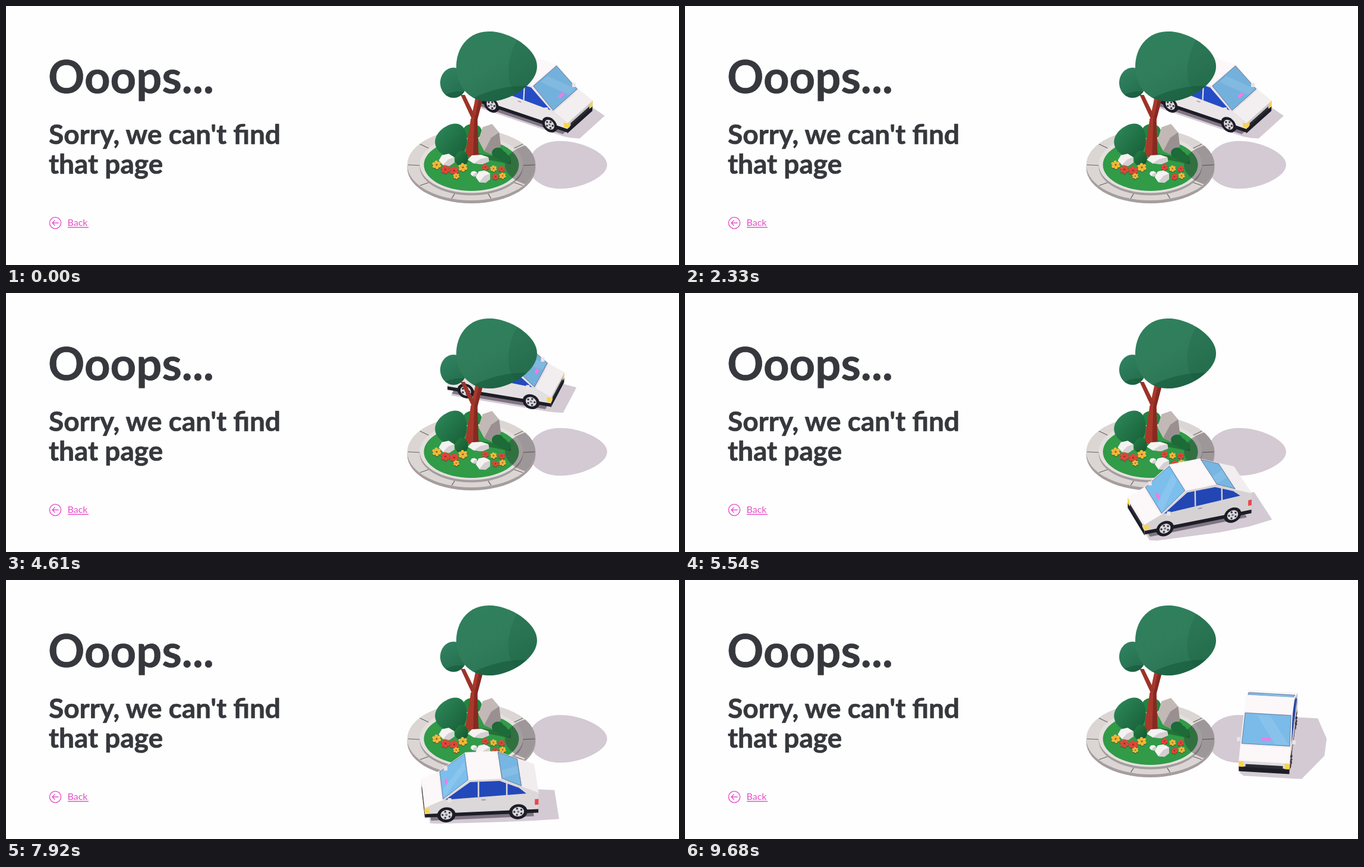
Write an HTML page with a canvas that moves like this. It is 1133 by 437 pixels and loops after 9.78 s.

```html
<!DOCTYPE html>
<html lang="en">
<head>
<meta charset="utf-8">
<title>Page not found</title>
<style>
  html, body { margin: 0; width: 100%; height: 100%; overflow: hidden; background: #fefefe; }
  canvas, svg { position: absolute; left: 0; top: 0; display: block; }
  text { font-family: Lato, "Open Sans", sans-serif; font-weight: 700; fill: #36383d; stroke: #36383d; stroke-width: .7; }
  .back text { font-weight: 400; fill: #e650c8; stroke: none; }
  .back path, .back circle { fill: none; stroke: #e650c8; stroke-width: 1.4; }
</style>
</head>
<body>
<canvas id="stage" width="1133" height="437"></canvas>
<svg width="1133" height="437">
  <text x="71" y="147" font-size="76">Ooops...</text>
  <text x="72" y="233" font-size="46">Sorry, we can't find</text>
  <text x="72" y="283" font-size="46">that page</text>
  <g class="back">
    <circle cx="83" cy="366" r="9.6"/>
    <path d="M88.5 366H78M82.5 361.5L78 366L82.5 370.5M104 373.5H139"/>
    <text x="103.5" y="371" font-size="16">Back</text>
  </g>
</svg>
<script>
const W = 1133, H = 437, LOOP = 9780, TAU = Math.PI * 2;
const CX = 783.5, CY = 268, TILT = 0.555, RISE = 0.832, ORBIT = 199;
const SHADOW = '#d3cad4', RED = '#e2463b', GOLD = '#f4b93a', BLACK = '#1d1d26';
let ctx;

// ---- drawing helpers ----
const ring = (n, f) => Array.from({ length: n }, (_, i) => f(i * TAU / n, i));

function poly(pts, fill, stroke, width = 1) {
  ctx.beginPath();
  pts.forEach(([x, y]) => ctx.lineTo(x, y));
  ctx.closePath();
  ctx.fillStyle = fill;
  ctx.fill();
  if (stroke) { ctx.strokeStyle = stroke; ctx.lineWidth = width; ctx.stroke(); }
}

// Ellipse that narrows towards its leading end
function egg(x, y, rx, ry, fill, taper = 0, turn = 0) {
  const c = Math.cos(turn), s = Math.sin(turn);
  poly(ring(60, a => {
    const u = rx * Math.cos(a), v = ry * Math.sin(a) * (1 - taper * Math.cos(a));
    return [x + u * c - v * s, y + u * s + v * c];
  }), fill);
}

// Keeps what is painted inside the egg drawn last
function within(inside) {
  ctx.save();
  ctx.clip();
  inside();
  ctx.restore();
}

function ramp(x0, y0, x1, y1, ...colors) {
  const g = ctx.createLinearGradient(x0, y0, x1, y1);
  colors.forEach((c, i) => g.addColorStop(i / (colors.length - 1), c));
  return g;
}

function random(seed) {
  return () => (seed = seed * 16807 % 2147483647) / 2147483647;
}

function stone(x, y, rx, ry, seed, light, dark) {
  const rnd = random(seed * 7919);
  const edge = ring(7, a => {
    const r = 0.88 + 0.16 * rnd();
    return [x + rx * r * Math.cos(a - 0.5), y + ry * r * Math.sin(a - 0.5)];
  });
  poly(edge, light);
  poly([[x + rx * 0.1, y - ry * 0.1], ...edge.slice(0, 4)], dark);
}

function limb(x0, y0, w0, x1, y1, w1, color) {
  const side = (x, y, w) => [[x - w / 2, y], [x + w / 2, y]];
  poly([...side(x0, y0, w0), ...side(x1, y1, w1).reverse()], color);
}

function flower(x, y, r, color) {
  for (const [drop, fill] of [[1.2, 'rgba(70,30,10,.5)'], [0, color]])
    ring(6, a => egg(x + Math.cos(a + 0.4) * r * 0.65, y + drop + Math.sin(a + 0.4) * r * 0.6, r * 0.33, r * 0.33, fill));
  egg(x, y, r * 0.45, r * 0.4, color);
  egg(x, y, r * 0.2, r * 0.2, 'rgba(110,40,10,.65)');
}

function flowerRow(x, y, n, gap, rise, r, isRed) {
  for (let i = 0; i < n; i++)
    flower(x + gap * i, y + rise * Math.sin(i * 0.9), r, isRed(i) ? RED : GOLD);
}

// ---- roundabout ----
const treeShade = (fill, grow = 0) => egg(946, 268, 66 + grow, 39.5, fill, 0.2);

function drawRing() {
  egg(CX, 273, 108, 60, '#a59d9e');
  egg(CX, 268, 108, 60, '#dbd6d3');
  ctx.strokeStyle = '#6a6364';
  ctx.lineWidth = 1.2;
  ring(10, a => {
    const c = Math.cos(a), s = Math.sin(a);
    ctx.beginPath();
    ctx.moveTo(CX + 87 * c, 269 + 48 * s);
    ctx.lineTo(CX + 107 * c, 268 + 59.5 * s);
    ctx.stroke();
  });
  egg(CX, 271, 87, 48.5, '#a49c9f');
  egg(CX, 267, 87, 48.5, '#e4e0de');
  egg(CX, 268, 80, 44, '#319b48');
  egg(CX, 268, 108, 60, 'transparent');
  within(() => {
    treeShade('rgba(50,40,50,.36)', 40);
    poly([[788, 248], [850, 258], [850, 267], [790, 255]], 'rgba(20,50,30,.4)');
  });
}

function drawGarden() {
  egg(785, 212, 16, 13, '#21863f');
  egg(751, 226, 29, 26, ramp(730, 205, 778, 245, '#2b8556', '#186039'), 0.2, -1.1);
  stone(815, 225, 19, 27, 3, '#c2b9b6', '#9a9091');
  for (let i = 0; i < 3; i++) egg(828 + 7 * i, 248 + 5 * i, 10 - i, 9 - i, '#1c6b38');

  limb(784, 254, 23, 788, 190, 11, '#a9382b');
  limb(788, 192, 11, 798, 150, 13, '#a9382b');
  limb(787, 188, 8, 769, 150, 7, '#9c3328');
  limb(791, 252, 9, 791, 190, 5, '#852a23');
  limb(791, 192, 5, 801, 150, 7, '#852a23');

  const chalk = ['#f5f3f2', '#d5cfd1'];
  stone(743, 260, 14, 11, 5, ...chalk);
  egg(767, 257, 13, 11, ramp(757, 248, 778, 266, '#237c42', '#135630'), 0.1, -1.4);
  stone(797, 259, 19, 9, 2, ...chalk);
  stone(788, 283, 6, 5, 4, ...chalk);
  stone(804, 288, 13, 12, 8, ...chalk);

  flowerRow(725, 268, 4, 14.7, 10, 8, i => i % 3);
  flowerRow(807, 272, 3, 13.7, 3, 6, i => i % 2 === 0);
  flowerRow(824, 288, 2, 12, -2, 6, i => i === 0);
  flower(758, 287, 5.5, GOLD);
}

function drawCanopy() {
  egg(753.5, 129.5, 22.5, 25.5, ramp(736, 106, 770, 155, '#318361', '#226c4c'));
  within(() => egg(765, 160, 32, 16, 'rgba(12,70,45,.35)'));
  egg(826, 102, 68, 58, ramp(785, 45, 850, 165, '#2f805d', '#317d5b', '#277151'), 0.2);
  within(() => {
    egg(883, 90, 34, 62, 'rgba(18,84,56,.2)', 0, 0.3);
    egg(832, 164, 72, 24, 'rgba(14,76,48,.4)', 0, -0.25);
  });
}

function cache(draw) {
  const layer = document.createElement('canvas');
  layer.width = W;
  layer.height = H;
  ctx = layer.getContext('2d');
  draw();
  return layer;
}

const island = cache(() => { drawRing(); drawGarden(); drawCanopy(); });

// ---- car: side outline as [forward, up], extruded sideways ----
const OUTLINE = [[94, 12], [94, 30], [66, 43], [22, 80], [-30, 80], [-64, 63], [-91, 50], [-91, 12]];
const PANE = [...OUTLINE.slice(2, 6).map(([u, z]) => [u * 0.92, 53 + (z - 53) * 0.85]), [-71, 50]];
const AXLES = [59, -58], SIDES = [-1, 1];
const PAINT = [252, 247, 249], GLASS = [124, 190, 236], BLUE = [40, 82, 212];

const halfWidth = z => 42 - Math.max(0, z - 48) * 0.06;
const shade = (rgb, l) => `rgb(${rgb.map(c => Math.round(Math.min(255, c * l)))})`;
const rect = (f, a0, b0, a1, b1) => [f(a0, b0), f(a1, b0), f(a1, b1), f(a0, b1)];

function area(p) {
  return p.reduce((sum, [x, y], i) => {
    const [a, b] = p[(i + 1) % p.length];
    return sum + x * b - a * y;
  }, 0);
}

function hull(pts) {
  const sorted = [...pts].sort((a, b) => a[0] - b[0] || a[1] - b[1]);
  const half = list => {
    const out = [];
    for (const p of list) {
      while (out.length > 1 && area([out[out.length - 2], out[out.length - 1], p]) <= 0) out.pop();
      out.push(p);
    }
    return out.slice(0, -1);
  };
  return [...half(sorted), ...half(sorted.reverse())];
}

function makeCar(deg) {
  const th = deg * Math.PI / 180, head = th + Math.PI / 2;
  const c = Math.cos(head), s = Math.sin(head);
  const light = (nx, nz) => Math.min(1, 0.88 - 0.09 * nx + 0.13 * nz);

  function at(u, v, z) {
    const x = ORBIT * Math.cos(th) + u * c - v * s;
    const y = ORBIT * Math.sin(th) + u * s + v * c;
    const zoom = 1 / (1 - (y * RISE + z * TILT) / 6000);
    return [CX + x * zoom, CY + (TILT * y - RISE * z) * zoom];
  }

  function shadow() {
    const pts = [...OUTLINE, [86, 2], [-86, 2]].flatMap(([u, z]) => SIDES.map(k => {
      const [x, y] = at(u, k * halfWidth(z), 0);
      return [x + 0.7 * z, y + 0.03 * z];
    }));
    poly(hull(pts), SHADOW);
    poly(rect((u, v) => at(u, v, 3), 84, -40, -84, 40), 'rgba(60,48,66,.55)');
  }

  const disc = (u, v, r, fill) =>
    poly(ring(24, a => at(u + r * Math.cos(a), v, 15 + r * Math.sin(a))), fill);

  function wheel(u, v) {
    disc(u, v, 15, BLACK);
    disc(u, v, 9.5, '#dcd9de');
    ring(5, a => egg(...at(u + 6.3 * Math.cos(a), v, 15 + 6.3 * Math.sin(a)), 1.7, 1.7, '#3a3840'));
    disc(u, v, 2, '#77737c');
  }

  // Panel across the car between two outline points; null when it faces away
  function panel(i) {
    const [u0, z0] = OUTLINE[i], [u1, z1] = OUTLINE[i + 1];
    const on = (t, k) => {
      const z = z0 + (z1 - z0) * t;
      return at(u0 + (u1 - u0) * t, k * halfWidth(z), z);
    };
    const pts = rect(on, 0, -1, 1, 1);
    if (area(pts) * area([[0, 0], [1, 0], [1, 1]]) >= 0) return null;
    const len = Math.hypot(u1 - u0, z1 - z0);
    const l = light((z1 - z0) / len * c, (u0 - u1) / len);
    poly(pts, shade(PAINT, l), shade(PAINT, l), 0.5);
    return { on, l };
  }

  function glass(face, sticker) {
    if (!face) return;
    const { on, l } = face;
    poly(rect(on, 0.04, -0.95, 0.97, 0.95), shade(GLASS, l), 'rgba(25,35,80,.55)', 0.9);
    poly([on(0.08, -0.9), on(0.92, -0.1), on(0.92, 0.45), on(0.08, -0.35)], 'rgba(255,255,255,.1)');
    if (sticker) poly(rect(on, 0.17, -0.18, 0.26, 0.18), '#f07be6');
  }

  function flank(k) {
    if (k * c <= 0) return;
    const on = (u, z) => at(u, k * halfWidth(z), z);
    const l = light(-k * s, 0);
    poly(OUTLINE.map(p => on(...p)), shade(PAINT, l));
    poly(rect(on, 94, 11, -91, 18), BLACK);
    poly(PANE.map(p => on(...p)), shade(BLUE, l));
    for (const u of [8, -38]) poly(rect(on, u, 47, u - 2.5, 76), shade(PAINT, l));
    poly(rect(on, 2, 40, -5, 42), '#99939c');
    poly(rect(on, 94, 20, 87, 29), '#f8d548');
    poly(rect(on, -85, 27, -91, 38), '#e8484f');
    for (const u of AXLES) wheel(u, k * 42.5);
  }

  function lamp(p) {
    const g = ctx.createRadialGradient(...p, 1, ...p, 9);
    g.addColorStop(0, '#ffe04a');
    g.addColorStop(0.5, 'rgba(255,176,40,.85)');
    g.addColorStop(1, 'rgba(255,150,40,0)');
    egg(...p, 9, 9, g);
  }

  function body(blink) {
    for (const u of AXLES)
      for (let v = -42; v <= 42; v += 3) if (Math.abs(v) > 32) disc(u, v, 15, BLACK);
    if (panel(0)) {
      const on = (v, z) => at(94, v, z);
      poly(rect(on, -42, 9, 42, 19), BLACK);
      poly(rect(on, -31, 18, 31, 24), '#2b2b35');
      for (const k of SIDES) poly(rect(on, k * 34, 18, k * 42, 29), '#f8d548');
    }
    const tail = panel(6);
    if (tail) {
      const on = (v, z) => at(-91, v, z);
      poly(rect(on, -42, 11, 42, 17), BLACK);
      poly(rect(on, -14, 24, 14, 35), '#fff', '#d2c9cf', 0.6);
      for (const k of SIDES) poly(rect(on, k * 30, 25, k * 41, 37), '#e8484f');
    }
    panel(1);
    panel(5);
    SIDES.forEach(flank);
    glass(panel(2), true);
    glass(panel(4));
    panel(3);
    for (const k of SIDES) {
      const [x, y] = at(54, k * 46, 46);
      ctx.fillStyle = '#e9e4e8';
      ctx.fillRect(x - 3, y - 3.5, 6, 7);
    }
    if (blink && tail) lamp(at(-91, 37, 31));
    if (blink && c > 0) lamp(at(93, 42, 25));
  }

  return { shadow, body, near: Math.sin(th) > 0 };
}

// ---- timing: [ms, degrees round the circle] ----
const ROUTE = [[0, -58], [720, 50], [950, 86], [2330, 302], [3680, 503], [6480, 936], [9680, 1446]];

function angleAt(t) {
  if (t > 720 && t < 950) t = 720; // short stall
  t = Math.min(t, 9680);
  const i = Math.max(1, ROUTE.findIndex(([ms]) => ms >= t));
  const [t0, a0] = ROUTE[i - 1], [t1, a1] = ROUTE[i];
  return a0 + (a1 - a0) * (t - t0) / (t1 - t0);
}

const stage = document.getElementById('stage').getContext('2d');

function render(t) {
  ctx = stage;
  const car = makeCar(angleAt(t));
  const blink = t % 560 > 280;
  ctx.fillStyle = '#fefefe';
  ctx.fillRect(0, 0, W, H);
  treeShade(SHADOW);
  car.shadow();
  if (!car.near) car.body(blink);
  ctx.drawImage(island, 0, 0);
  if (car.near) car.body(blink);
}

const start = performance.now();
function tick() {
  render((performance.now() - start) % LOOP);
  requestAnimationFrame(tick);
}
tick();
</script>
</body>
</html>
```
